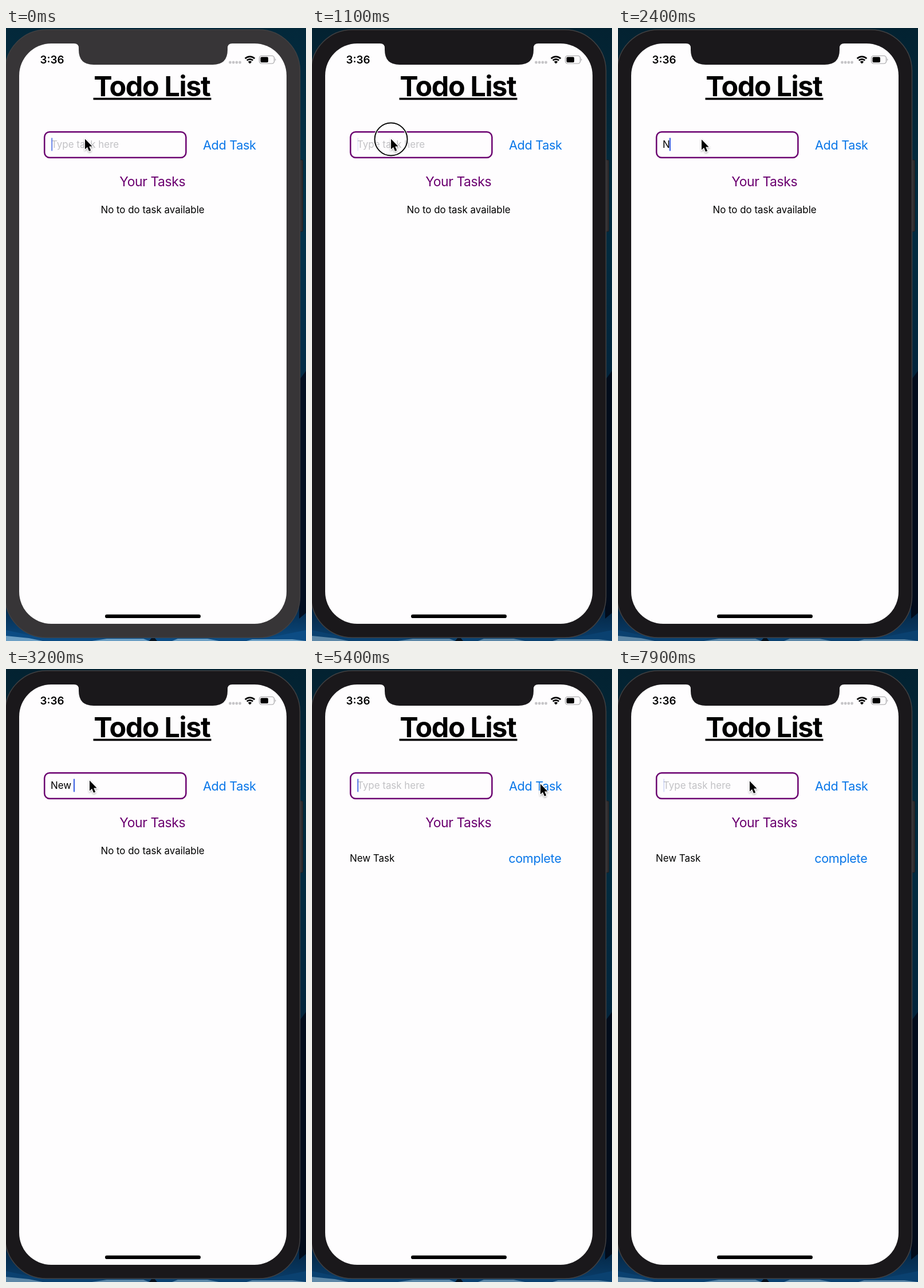
An HTML page for the animation above (8 s loop, 524 px wide and 1069 px high).

```html
<!DOCTYPE html>
<html lang="en">
<head>
<meta charset="utf-8">
<title>Todo List</title>
<style>
  html, body { margin: 0; width: 100%; height: 100%; overflow: hidden; background: #03283a; }
  svg { display: block; width: 524px; height: 1069px; }
  text { font-family: Inter, Roboto, "Liberation Sans", sans-serif; font-optical-sizing: none; white-space: pre; }
  .body { font-size: 16.9px; }
  .mid { text-anchor: middle; }
  .title { font-size: 48.5px; font-weight: 700; letter-spacing: -1.4px; }
  .clock { font-size: 18.8px; font-weight: 600; }
  .heading { font-size: 23px; letter-spacing: -.45px; fill: #6b0070; }
  .button { font-size: 21.7px; letter-spacing: -.35px; fill: #0876e8; }
  .hint { fill: #c2c2c5; }
</style>
</head>
<body>
<svg viewBox="0 0 524 1069">
  <defs>
    <linearGradient id="sky" x2="0" y2="1">
      <stop offset="0" stop-color="#03283a"/>
      <stop offset=".3" stop-color="#02344b"/>
      <stop offset=".56" stop-color="#022c47"/>
      <stop offset=".93" stop-color="#03213c"/>
      <stop offset="1" stop-color="#0b4a80"/>
    </linearGradient>
    <filter id="soft" x="-50%" y="-50%" width="220%" height="220%">
      <feDropShadow dx="0" dy="1.5" stdDeviation="1.4" flood-opacity=".35"/>
    </filter>
  </defs>

  <!-- desktop -->
  <rect width="524" height="1069" fill="url(#sky)"/>
  <path d="M524 598L512 614V1030L524 1020Z" fill="#020e20"/>
  <path d="M0 1050L60 1063H460L524 1050V1069H0Z" fill="#0c4c84"/>
  <path d="M0 1060L40 1064L64 1069H0ZM176 1065H240L250 1069H150ZM300 1065H352L372 1069H290ZM430 1066H500L524 1069H420Z" fill="#6c9fc4"/>
  <path d="M250 1069L254 1064H260L264 1069Z" fill="#071421"/>
  <rect id="shade" width="524" height="1069" opacity=".15"/>

  <!-- phone -->
  <rect x="511.5" y="230" width="7" height="125" rx="2" fill="#302e30" stroke="#1d1c1e"/>
  <rect id="bezel" x="-1.5" y="3" width="515" height="1060" rx="72" stroke="#414042" stroke-width="1.5"/>
  <rect x="23" y="27" width="467" height="1012" rx="56" fill="#fefdfe"/>
  <path id="notch" d="M119 26V27Q127 27 127 35V38Q127 64 153 64H361Q387 64 387 38V35Q387 27 395 27V26Z"/>
  <rect x="173" y="1022.8" width="167" height="6.2" rx="3.1"/>

  <!-- status bar -->
  <text class="clock mid" x="80.5" y="62">3:36</text>
  <path d="M391.5 60H410" stroke="#c6c5c8" stroke-width="4.8" stroke-linecap="round" stroke-dasharray="0 5.7"/>
  <g fill="none" stroke="#000" stroke-width="2.8">
    <path d="M417.7 53.3A11.8 11.8 0 0 1 434.3 53.3"/>
    <path d="M420.8 56.6A7.4 7.4 0 0 1 431.2 56.6"/>
  </g>
  <path d="M426 62.2L422.8 59Q426 56.2 429.2 59Z"/>
  <rect x="442.5" y="48.5" width="26" height="13.5" rx="4" fill="none" stroke="#a09fa2" stroke-width="1.2"/>
  <rect x="444.5" y="50.5" width="13.5" height="9.5" rx="2"/>
  <path d="M470.2 53Q472.5 55.2 470.2 57.5Z" fill="#a09fa2"/>

  <!-- app -->
  <text class="title mid" x="254.8" y="118.5">Todo List</text>
  <rect x="152.5" y="121.7" width="206" height="3.6"/>
  <rect x="67.2" y="181.2" width="247.2" height="44.8" rx="9" fill="none" stroke="#6b0070" stroke-width="2.5"/>
  <text id="hint" class="body hint" x="79" y="209">Type task here</text>
  <text id="entry" class="body" x="78" y="209"></text>
  <rect id="caret" y="191.5" width="2.3" height="23" rx="1" fill="#4467e2"/>
  <text class="button mid" x="390.3" y="211.5">Add Task</text>
  <text class="heading mid" x="255.7" y="276">Your Tasks</text>
  <text id="empty" class="body mid" x="256" y="323">No to do task available</text>
  <g id="task">
    <text class="body" x="66" y="336">New Task</text>
    <text class="button mid" x="389.3" y="338.3">complete</text>
  </g>
  <g id="paste">
    <rect x="36.5" y="124" width="87" height="44.5" rx="8.5" fill="#242425"/>
    <path d="M68 168L80 180.5L92 168Z" fill="#242425"/>
    <text class="mid" x="80" y="152" font-size="16.5" fill="#f4f4f4">Paste</text>
  </g>

  <!-- pointer -->
  <g id="pointer">
    <g id="ring" fill="none">
      <circle r="28.5" stroke="#fff" stroke-width="4"/>
      <circle r="28.5" stroke="#0a0a0a" stroke-width="2"/>
    </g>
    <path d="M0 -.5V17.5L4.1 13.7L7 20.8L10.2 19.5L7.2 12.5H12.6Z" stroke="#fff" stroke-width="2.2" paint-order="stroke" filter="url(#soft)"/>
  </g>
</svg>
<script>
const LOOP = 8000;
const FOCUS = 1000, MENU = 1500, TYPE = 2400, RESUME = 3400, ADD = 5000;
const HOME = { x: 138, y: 194 };
const glides = [
  { at: 1300, lasts: 400, dx: 8, dy: 1 },
  { at: 4100, lasts: 600, dx: 233, dy: 34 },
  { at: 4720, lasts: 260, dx: 20, dy: -28 },
  { at: 5500, lasts: 600, dx: -169, dy: -5 }
];

const $ = id => document.getElementById(id);
const clamp = v => Math.min(1, Math.max(0, v));
const ramp = (t, at, lasts) => clamp((t - at) / lasts);
const ease = u => u * u * (3 - 2 * u);
const show = (id, on) => { $(id).style.display = on ? "" : "none"; };
const clicked = (t, at) => t >= at && t < at + 200;

// Letters of a word typed since a moment, one per step
const typed = (word, t, at, step) => word.slice(0, Math.max(0, Math.floor((t - at) / step) + 1));

// One blink a second, brightest at each multiple of 1000
const blink = t => clamp(.5 + Math.cos(t * Math.PI / 500));

function caretAlpha(t) {
  if (t < MENU) return blink(t + 215);
  if (t < TYPE) return 0;
  return t < ADD - 400 ? 1 : blink(t - 600);
}

function pointerAt(t) {
  return glides.reduce(({ x, y }, g) => {
    const u = ease(ramp(t, g.at, g.lasts));
    return { x: x + g.dx * u, y: y + g.dy * u };
  }, HOME);
}

function draw(t) {
  const active = t >= FOCUS, added = t >= ADD + 100;
  $("bezel").setAttribute("fill", active ? "#1a181b" : "#373537");
  $("notch").setAttribute("fill", active ? "#1a181b" : "#373537");
  show("shade", active);

  const text = added ? "" : typed("New ", t, TYPE, 100) + typed("Task", t, RESUME, 160);
  const entry = $("entry");
  if (entry.textContent !== text) entry.textContent = text;
  show("hint", !text);
  $("caret").setAttribute("x", 77 + (text ? entry.getComputedTextLength() : 2));
  $("caret").setAttribute("opacity", caretAlpha(t));

  show("empty", !added);
  show("task", added);
  $("paste").setAttribute("opacity", ramp(t, MENU, 200) - ramp(t, TYPE - 100, 100));

  const { x, y } = pointerAt(t);
  $("pointer").setAttribute("transform", `translate(${x} ${y})`);
  show("ring", clicked(t, FOCUS) || clicked(t, ADD));
}

const start = performance.now();
function tick() {
  draw((performance.now() - start) % LOOP);
  requestAnimationFrame(tick);
}
tick();
</script>
</body>
</html>
```
